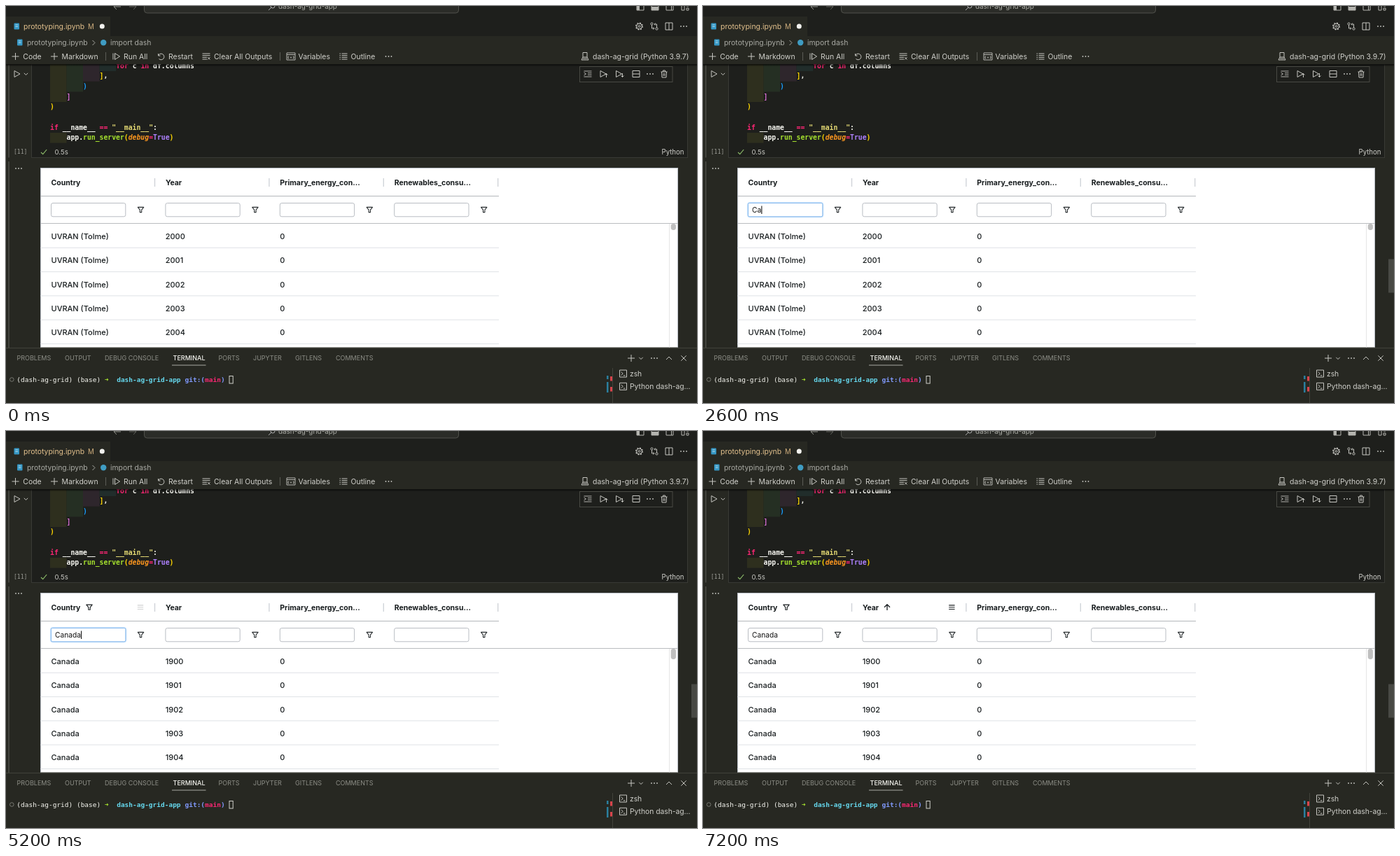
An HTML page that plays this animation: 987x567 px, repeating every 8 s.

```html
<!DOCTYPE html>
<html lang="en">
<head>
<meta charset="utf-8">
<title>Notebook grid filter</title>
<style>
  html, body { margin: 0; width: 100%; height: 100%; overflow: hidden; background: #272822; }
  svg { display: block; width: 987px; height: 567px; }
  text { font-family: Inter, "Noto Sans", sans-serif; white-space: pre; }
  .mono { font-family: "DejaVu Sans Mono", "Liberation Mono", monospace; }
  .bold { font-weight: 700; }
  .medium { font-weight: 500; }
</style>
</head>
<body>
<svg id="stage" viewBox="0 0 987 567"></svg>
<script>
const LOOP = 8000;
const stage = document.getElementById('stage');
const out = [];
const add = (...parts) => out.push(...parts);

const rect = (x, y, w, h, fill, extra = '') =>
  `<rect x="${x}" y="${y}" width="${w}" height="${h}" fill="${fill}" ${extra}/>`;
const text = (x, y, value, size, fill, extra = '') =>
  `<text x="${x}" y="${y}" font-size="${size}" fill="${fill}" ${extra}>${value}</text>`;
const line = (d, color, width = 1, extra = '') =>
  `<path d="${d}" fill="none" stroke="${color}" stroke-width="${width}" ${extra}/>`;
const icon = (x, y, d, color = '#c5c5c0', width = 1) =>
  line(d, color, width, `transform="translate(${x} ${y})" stroke-linejoin="round"`);
const dots = (x, y, color = '#c5c5c0') => [-4, 0, 4].map(dx =>
  `<circle cx="${x + dx}" cy="${y}" r=".9" fill="${color}"/>`).join('');
const spans = pairs => pairs.map(([value, color, style = '']) =>
  `<tspan fill="${color}" ${style}>${value}</tspan>`).join('');

const shape = {
  plus: 'M-5 0H5M0-5V5',
  play: 'M-3.5-4.5L4.5 0L-3.5 4.5Z',
  down: 'M-2.7-1.2L0 1.5L2.7-1.2',
  up: 'M-4 2L0-2L4 2',
  close: 'M-3.7-3.7L3.7 3.7M3.7-3.7L-3.7 3.7',
  split: 'M-5-5H5V5H-5ZM0-5V5',
  halves: 'M-5-4.5H5V4.5H-5ZM-5 0H5',
  shell: 'M-5-5H5V5H-5ZM-2.8-2.5L-.3 0L-2.8 2.5M.4 2.8H3',
  funnel: 'M-4.2-3.6H4.2L1.2 .2V3.6H-1.2V.2Z',
  menu: 'M-4.2-2.8H4.2M-4.2 0H4.2M-4.2 2.8H4.2',
  arrowUp: 'M0 4.3V-4M-4 0L0-4L4 0'
};

function windowBars() {
  add(rect(0, 0, 987, 567, '#272822'), rect(0, 0, 987, 43, '#1e1f1c'), rect(0, 15, 149, 28, '#272822'));
  add(rect(197.5, -10, 449, 20, '#2b2c28', 'rx="4" stroke="#50514c"'));
  add(icon(159, 1, 'M5 0H-5M-1-4L-5 0L-1 4', '#8c8d87'), icon(181, 1, 'M-5 0H5M1-4L5 0L1 4', '#5e5f59'));
  add('<circle cx="381" cy="0" r="3" fill="none" stroke="#aaa"/>', line('M379 2L375 6', '#aaa'));
  add(text(389, 4.3, 'dash-ag-grid-app', 9.9, '#a9aaa4'));
  [906, 927, 948].forEach(x => add(icon(x, 1, 'M-5-5H-5V5H5V-5', '#b5b5b0')));
  add(rect(901, -4, 4, 10, '#b5b5b0'), rect(922, 1, 10, 5, '#b5b5b0'), line('M950.5 -4V6', '#b5b5b0'));
  add(icon(970, 1, 'M-5-5H-1V5H-5ZM2-5H5V-1H2ZM2 2H5V5H2Z', '#b5b5b0'));

  add(rect(11.5, 24.5, 7.5, 9, '#3698c6', 'rx="1"'), line('M13.5 27H17M13.5 29.5H17', '#d4e8f0', .8));
  add(text(25, 33, 'prototyping.ipynb', 10.45, '#e2c08d'), text(117, 33, 'M', 9.7, '#cfae7d'));
  add('<circle cx="137.3" cy="29" r="3.5" fill="#f2f2ee"/>');
  add('<circle cx="904.5" cy="29" r="4.8" fill="none" stroke="#c5c5c0" stroke-width="1.4" stroke-dasharray="1.9 1.87"/>',
    '<circle cx="904.5" cy="29" r="3.9" fill="none" stroke="#c5c5c0"/><circle cx="904.5" cy="29" r="1.4" fill="none" stroke="#c5c5c0"/>');
  add(icon(926, 29, 'M-3.5-2V3H0M-1.5 1.5L0 3L-1.5 4.5M3.5 2V-3H0M1.5-4.5L0-3L1.5-1.5'),
    '<circle cx="922.5" cy="25.5" r="1.6" fill="none" stroke="#c5c5c0"/><circle cx="929.5" cy="32.5" r="1.6" fill="none" stroke="#c5c5c0"/>');
  add(icon(947, 29, shape.split), dots(968, 29));

  add(rect(16, 47.5, 7.5, 9, '#3698c6', 'rx="1"'), line('M18 50H21.5M18 52.5H21.5', '#d4e8f0', .8));
  add(text(30, 56.2, 'prototyping.ipynb', 10.4, '#a9aaa4'), icon(125, 52.5, 'M-1.5-3.5L2 0L-1.5 3.5', '#a9aaa4'));
  add('<circle cx="139.2" cy="52.3" r="4.2" fill="#3f9cc2"/>', text(149, 56.2, 'import dash', 10.4, '#a9aaa4'));
}

function notebookToolbar() {
  const ink = '#d0d0cb';
  [[24.3, 'Code'], [79.5, 'Markdown'], [168, 'Run All'], [232, 'Restart'], [297, 'Clear All Outputs'],
   [417.5, 'Variables'], [492.5, 'Outline'], [838, 'dash-ag-grid (Python 3.9.7)']]
    .forEach(([x, label]) => add(text(x, 75.9, label, 10.45, ink)));
  add(icon(13.5, 72, shape.plus), icon(69, 72, shape.plus), line('M142.5 66V78M391.5 66V78', '#5b5c56'));
  add(icon(157.5, 72, 'M-4.5-4.5V4.5M-2-4.5L5 0L-2 4.5Z'));
  add(icon(221.5, 72, 'M-4-4V-1H-1M-4-1A4.3 4.3 0 1 1-3 3.5'));
  add(icon(286, 72, 'M-5.5-4H5.5M-5.5-1.3H5.5M-5.5 1.3H1M-5.5 4H1M2 1L5.5 4.5M5.5 1L2 4.5'));
  add(icon(407, 72, 'M-6-5H6V5H-6ZM-6-2.5H6M-3 0H-4V3H-3M3 0H4V3H3M-1 .5L1 2.5M1 .5L-1 2.5', '#c5c5c0', .9));
  add(icon(482, 72, 'M-5.5-4H-4M-5.5-1.3H-4M-5.5 1.3H-4M-5.5 4H-4M-2.5-4H5.5M-2.5-1.3H5.5M-2.5 1.3H5.5M-2.5 4H5.5'));
  add(dots(546.5, 72), icon(827, 72, 'M-3-5.5H3V1H-3ZM-3 1L-5 5H5L3 1M-3 3H3'));
}

function codeCell() {
  add(rect(36.5, 83, 937, 133.5, '#1e1f1c', 'stroke="#393a35"'), rect(0, 79, 987, 4, '#272822'));
  add(line('M4 84V216.5M4 222V488', '#4b4c46', 1.6));
  add(rect(63, 83, 23.5, 54, '#2e2f1e'), rect(86.5, 83, 23.5, 39.5, '#252f23'),
    rect(110, 83, 23.6, 24.7, '#2e262c'), rect(133.6, 83, 23.6, 10, '#212d2b'), rect(63, 181, 23.5, 14.6, '#2e2f1e'));
  const pink = '#f92672', white = '#f8f8f2', green = '#a6e22e', gold = '#ffd700';
  const italic = 'font-style="italic"';
  const rows = [
    [157.2, 89, [['for', pink], [' c ', white], ['in', pink], [' df.columns', white]]],
    [133.6, 103.4, [[']', gold], [',', white]]],
    [110, 118, [[')', '#179fff']]],
    [86.5, 132.5, [[']', '#da70d6']]],
    [63, 147.2, [[')', gold]]],
    [63, 176.8, [['if', pink], [' __name__ ', white], ['==', pink], [' ', white], ['"__main__"', '#e6db74'], [':', white]]],
    [86.5, 191.3, [['app.', white], ['run_server', green], ['(', gold], ['debug', '#fd971f', italic],
      ['=', pink], ['True', '#ae81ff'], [')', gold]]]
  ];
  add('<clipPath id="cell"><rect x="37" y="83" width="936" height="133"/></clipPath><g clip-path="url(#cell)">');
  rows.forEach(([x, y, pairs]) => add(text(x, y, spans(pairs), 9.78, white, 'class="mono bold"')));
  add('</g>');
  add('<linearGradient id="shade" x2="0" y2="1"><stop stop-opacity=".7"/><stop offset="1" stop-opacity="0"/></linearGradient>');
  add(rect(0, 83, 987, 3.5, 'url(#shade)'));

  add(icon(15.5, 97, shape.play), icon(28.5, 97, shape.down));
  add(text(11, 211, '[11]', 8, '#9a9b95', 'class="mono"'));
  add(icon(54, 208.5, 'M-4 .5L-1.3 3.2L4.2-3.5', '#8fbf6b', 1.1), text(69.5, 211.8, '0.5s', 9.6, '#c8c8c3'));
  add(text(936.5, 211.8, 'Python', 9.65, '#d0d0cb'), dots(18, 232));

  add(rect(819.5, 86.5, 132.5, 22, '#1e1f1c', 'stroke="#484943"'));
  add(icon(831, 97, 'M-5.5-4H5.5M0-1.3H5.5M0 1.3H5.5M-5.5 4H5.5M-5.5-2L-2.5 0L-5.5 2', '#c5c5c0', .9));
  add(icon(852.5, 97, shape.play), icon(857.5, 99, 'M0 3V-2.5M-2-.5L0-2.5L2-.5'));
  add(icon(875, 97, shape.play), icon(880.5, 99, 'M0-3V2.5M-2 .5L0 2.5L2 .5'));
  add(icon(900, 97, shape.halves), dots(920, 97));
  add(icon(940, 97, 'M-4.5-3H4.5M-1.5-3V-5H1.5V-3M-3.5-3L-3 5H3L3.5-3M-1-1V3M1-1V3'));
}

function grid() {
  const left = 64.5, step = 163.4, rowStep = 34.3;
  add('<clipPath id="output"><rect x="49" y="231" width="911" height="256.5"/></clipPath><g clip-path="url(#output)">');
  add(rect(49.5, 231.5, 910, 260, '#fff', 'stroke="#babfc7"'));
  ['Country', 'Year', 'Primary_energy_con...', 'Renewables_consu...'].forEach((label, i) => {
    const x = left + i * step;
    add(text(x, 255.8, label, 10.5, '#181d1f', 'class="bold"'));
    add(line(`M${x + 148} 246V258`, '#cdd1d6', 1.3));
    add(rect(x, 281.5, 106.3, 19.3, '#fff', 'rx="2.5" stroke="#b9bdc3"'));
    add(icon(x + 128, 291, shape.funnel, '#2a2f31', 1.1));
  });
  add(line('M49 271.5H704', '#b4b7ba'), line('M49 310.5H960', '#b9bcc0'));
  for (let i = 0; i < 5; i++) {
    const y = 333 + i * rowStep;
    add(text(left, y, '', 11, '#181d1f', 'class="medium" data-country'));
    add(text(left + step - .2, y, '', 11, '#181d1f', 'class="medium" data-year'));
    add(text(left + 2 * step, y, '0', 11, '#181d1f', 'class="medium"'));
    add(line(`M49 ${345.3 + i * rowStep}H704`, '#dfe2e6'));
  }
  add(line('M947.5 311V488', '#e6e6e6'), rect(949.7, 311, 7.2, 9, '#bfbfbf', 'rx="3.4" id="thumb"'));
  add('<g id="focus">', rect(left, 281.5, 106.3, 19.3, 'none', 'rx="2.5" stroke="#b5d8fb" stroke-width="3" opacity=".75"'),
    rect(left, 281.5, 106.3, 19.3, '#fff', 'rx="2" stroke="#8abbee"'), '</g>');
  add(text(70, 294.8, '', 10.2, '#111', 'id="query"'), rect(70, 285.5, 1, 11.5, '#000', 'id="caret"'));
  const hidden = (id, x, d, width) => add(`<g id="${id}">`, icon(x, 251.7, d, '#181d1f', width), '</g>');
  hidden('filtered', 119, shape.funnel, 1.1);
  hidden('countryMenu', 192, shape.menu, 1.1);
  hidden('yearMenu', 355.4, shape.menu, 1.1);
  hidden('sorted', 263, shape.arrowUp, 1.3);
  add('</g>', rect(979, 361.5, 8, 48, '#484944', 'id="scrollbar"'));
}

function panel() {
  add(rect(0, 488, 987, 79, '#272822'), line('M0 488.5H987', '#41423b'));
  [[15.5, 'PROBLEMS'], [84, 'OUTPUT'], [141, 'DEBUG CONSOLE'], [238.5, 'TERMINAL'], [303.5, 'PORTS'],
   [353, 'JUPYTER'], [413, 'GITLENS'], [471, 'COMMENTS']].forEach(([x, label]) => {
    const active = label === 'TERMINAL';
    add(text(x, 506.3, label, 9, active ? '#f4f4ef' : '#8d8e87', active ? 'class="medium"' : ''));
  });
  add(line('M237 513H285.5', '#a9aaa3'));
  add(icon(893, 503, shape.plus), icon(907, 503, shape.down), dots(926, 503),
    icon(947, 503, shape.up), icon(968, 503, shape.close));

  const prompt = (x, value, color, extra = '') => add(text(x, 536.7, value, 9.49, color, `class="mono ${extra}"`));
  add('<circle cx="8.3" cy="533.5" r="2.8" fill="none" stroke="#777871"/>');
  prompt(15.3, '(dash-ag-grid) (base)', '#f8f8f2');
  prompt(141, '➜', '#a6e22e', 'bold');
  prompt(158.2, 'dash-ag-grid-app', '#66d9ef', 'bold');
  prompt(255.5, spans([['git:(', '#819aff'], ['main', '#f92672'], [')', '#819aff']]), '#819aff', 'bold');
  add(rect(319, 528.5, 5.2, 10.5, 'none', 'stroke="#d0d0cb"'));
  add(line('M866.5 517V567', '#41423b'));
  add(rect(858, 528, 2.5, 5, '#2a7f9e'), rect(858, 537, 2.5, 15, '#2a7f9e'),
    rect(863, 529, 3, 6.5, '#d9434b'), rect(863, 544, 3, 6.5, '#d9434b'));
  add(icon(881.5, 525, shape.shell), text(891, 528.9, 'zsh', 10.3, '#d0d0cb'));
  add(icon(881.5, 543.3, shape.shell), text(891, 547.2, 'Python dash-ag...', 10.3, '#d0d0cb'));
}

windowBars();
notebookToolbar();
codeCell();
grid();
panel();
stage.innerHTML = out.join('');

// Each track lists [start in ms, value]; values hold until the next start.
const typed = [[0, 0], [2400, 1], [2600, 2], [2700, 3], [2900, 4], [3000, 5], [3200, 6]];
const caretOn = [[0, 0], [1500, 1], [2000, 0], [2400, 1], [3700, 0], [4200, 1], [4700, 0],
  [5200, 1], [5700, 0], [6200, 1], [6700, 0]];
const countryHover = [[0, 0], [5200, .2], [5300, .7], [5400, 1], [5500, .6], [5600, .2], [5700, 0]];
const yearHover = [[0, 0], [5500, .2], [5600, .6], [5700, .9], [5800, 1]];
const at = (track, t) => track.findLast(([start]) => t >= start)[1];

const byId = id => document.getElementById(id);
const fade = (id, opacity) => { byId(id).style.opacity = opacity; };
const setText = (node, value) => { if (node.textContent !== value) node.textContent = value; };
const countries = [...stage.querySelectorAll('[data-country]')];
const years = [...stage.querySelectorAll('[data-year]')];

function render(now) {
  const t = now % LOOP;
  const filtered = t >= 4200;
  const query = byId('query');
  setText(query, 'Canada'.slice(0, at(typed, t)));
  byId('caret').setAttribute('x', 70.2 + (query.textContent ? query.getComputedTextLength() : 0));
  fade('caret', at(caretOn, t));
  fade('focus', +(t >= 1500 && t < 7000));
  fade('scrollbar', +(t >= 1500));
  fade('filtered', +filtered);
  fade('sorted', +(t >= 7100));
  fade('countryMenu', at(countryHover, t));
  fade('yearMenu', at(yearHover, t));
  byId('thumb').setAttribute('height', filtered ? 15 : 9);
  countries.forEach(node => setText(node, filtered ? 'Canada' : 'UVRAN (Tolme)'));
  years.forEach((node, i) => setText(node, String((filtered ? 1900 : 2000) + i)));
}

const begin = performance.now();
function tick() {
  render(performance.now() - begin);
  requestAnimationFrame(tick);
}
tick();
</script>
</body>
</html>
```
